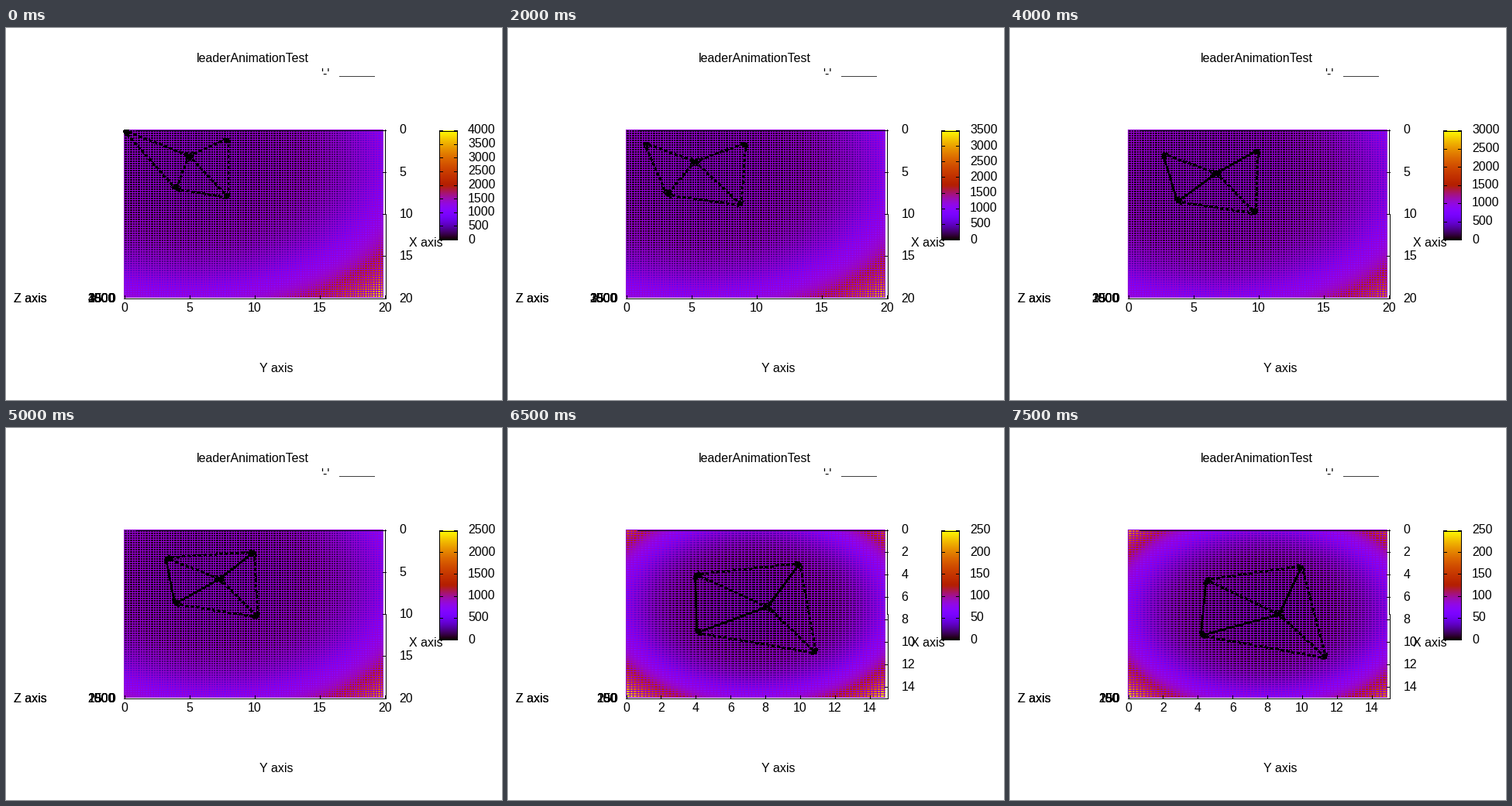
Write a matplotlib script that moves like this. It is 640 by 480 pixels and loops after 8 s.

```python
import numpy as np
import matplotlib.pyplot as plt
from matplotlib.animation import FuncAnimation

W, H, DPI = 640, 480, 100
FRAMES, STEP = 16, 500
LEFT, TOP, WIDE, TALL = 152, 131, 336.8, 217
PX = 72 / DPI
VIOLET = (148 / 255, 0, 211 / 255)
plt.rcParams["font.family"] = "Liberation Sans"

# Waypoints of the five agents in plot units; they glide straight between them.
KEYS = (0, 4, 8, 15)
PATHS = (
    ((0, 0), (1.4, 1.5), (2.7, 2.8), (4.5, 4.4)),
    ((5, 3), (5.3, 3.7), (6.8, 5.1), (8.7, 7.5)),
    ((8, 1), (9.2, 1.5), (10, 2.3), (10, 3.2)),
    ((4, 7), (3.15, 7.7), (3.8, 8.5), (4.2, 9.4)),
    ((8, 8), (8.85, 8.9), (9.8, 9.9), (11.4, 11.4)),
)
CHAIN = ((0, 3), (1, 3), (1, 2))
SPOKES = ((0, 1), (1, 4), (2, 4), (3, 4))
SOLID_START, BRIDGE_START, ZOOM_START = 8, 10, 11

fig = plt.figure(figsize=(W / DPI, H / DPI), dpi=DPI, facecolor="white")
ax = fig.add_axes([0, 0, 1, 1])


def palette(v):
    v = np.clip(v, 0, 1)
    return np.stack([np.sqrt(v), v ** 3, np.clip(np.sin(2 * np.pi * v), 0, 1)], -1)


def axis_range(n):
    """Length of both ground axes and their tick step."""
    return (20, 5) if n < ZOOM_START else (15, 2)


def height_range(n):
    """Top of the colour bar and its tick step."""
    if n < ZOOM_START:
        return 4000 - 500 * sum(n >= k for k in (4, 6, 9)), 500
    return (300 if n < 13 else 200 if n == 14 else 250), 50


def agents(n):
    return np.array([[np.interp(n, KEYS, axis) for axis in zip(*path)] for path in PATHS])


def surface(n):
    """Bowl around the agents' centre, seen through a violet wire mesh."""
    units, _ = axis_range(n)
    top, _ = height_range(n)
    y, x = np.mgrid[0:217, 0:335]
    cx, cy = agents(n).mean(axis=0)
    dist2 = (x * units / WIDE - cx) ** 2 + (y * units / TALL - cy) ** 2
    img = palette(dist2 ** 2 / 58 / top)
    column = 2 * WIDE / units / 10
    img[(y % 3 == 0) | (x % column < 1)] = VIOLET
    return img


def line(xs, ys, width=1, color="black", **kw):
    ax.plot(xs, ys, color=color, lw=width * PX, antialiased=False,
            solid_capstyle="butt", dash_capstyle="butt", **kw)


def text(x, y, s, ha="left"):
    ax.text(x, y + 5.5, s, ha=ha, va="baseline", fontsize=16 * PX, color="black")


def link(a, b, solid):
    line(*zip(a, b), 1.6, ls="-" if solid else (0, (2.5, 2)))
    for tip, tail in ((a, b), (b, a)):
        back = np.arctan2(tail[1] - tip[1], tail[0] - tip[0])
        for turn in (-0.35, 0.35):
            line([tip[0], tip[0] + 6 * np.cos(back + turn)],
                 [tip[1], tip[1] + 6 * np.sin(back + turn)], 1.5)


def draw_axes(n):
    units, step = axis_range(n)
    mid = TOP + TALL / 2
    line([LEFT + 15, 489], [131.5, 131.5])
    line([LEFT, 490], [348.5, 348.5])
    line([488.5, 488.5], [131, mid])
    line([489.5, 489.5], [mid, 349])
    for value in range(0, units + 1, step):
        tx = LEFT + value * WIDE / units
        ty = TOP + value * TALL / units
        line([tx + .5, tx + .5], [345, 349])
        line([486, 490], [ty + .5, ty + .5])
        text(tx + .5, 361, str(value), "center")
        text(507.5, ty, str(value))


def draw_colour_bar(n):
    top, step = height_range(n)
    ramp = palette(np.linspace(1, 0, 140))[:, None]
    ax.imshow(ramp, extent=(559, 582, 273, 132), interpolation="nearest", aspect="auto")
    line([559, 582, 582, 559, 559], [132.5, 132.5, 273, 273, 132.5])
    for value in range(0, top + 1, step):
        y = 273 - 141 * value / top
        for x in (559, 578):
            line([x, x + 4], [y, y])
        text(596, y - 1, str(value))
        text(141, 349, str(value), "right")


def draw(n):
    ax.clear()
    ax.axis("off")
    ax.imshow(surface(n), extent=(LEFT, 487, 348, 131),
              interpolation="nearest", aspect="auto")
    draw_axes(n)
    draw_colour_bar(n)

    units, _ = axis_range(n)
    nodes = agents(n) * (WIDE / units, TALL / units) + (LEFT, TOP + 1)
    for i, j in CHAIN:
        link(nodes[i], nodes[j], n >= SOLID_START)
    for i, j in SPOKES + ((0, 2),) * (n >= BRIDGE_START):
        link(nodes[i], nodes[j], False)

    text(318, 38, "leaderAnimationTest", "center")
    text(406, 58, "'-'")
    line([430, 475], [61.5, 61.5], color="#404040")
    for _ in range(2):
        text(9.5, 348, "Z axis")
    text(348.5, 438, "Y axis", "center")
    text(519.5, 276, "X axis")
    ax.set_xlim(0, W)
    ax.set_ylim(H, 0)
    return []


anim = FuncAnimation(fig, draw, frames=FRAMES, interval=STEP, repeat=True,
                     repeat_delay=0, init_func=lambda: [], blit=False)
plt.show()
```
